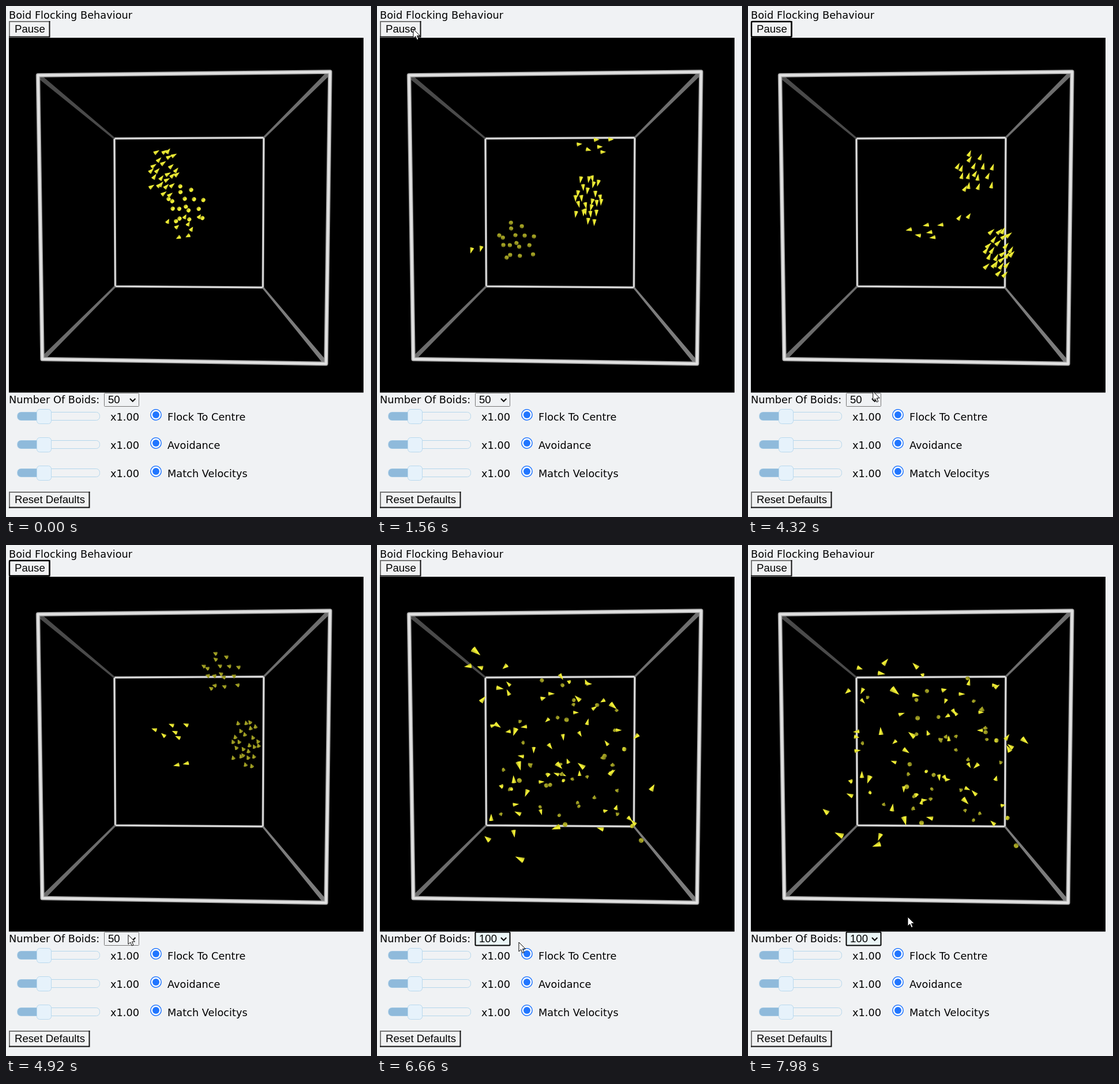
Write an HTML page with a canvas that moves like this. It is 633 px wide and 885 px high and loops after 8 s.

```html
<!DOCTYPE html>
<html lang="en">
<head>
<meta charset="utf-8">
<title>Boid Flocking Behaviour</title>
<style>
  html, body { margin: 0; width: 633px; height: 885px; overflow: hidden; background: #f0f2f4; }
  canvas, svg { position: absolute; left: 0; top: 0; }
  text { font: 17.75px Verdana, "DejaVu Sans", sans-serif; fill: #000; }
  .ui { font: 18.6px "Liberation Sans", Arial, sans-serif; }
</style>
</head>
<body>
<canvas id="stage" width="633" height="885"></canvas>
<svg width="633" height="885">
  <text x="5" y="21.5">Boid Flocking Behaviour</text>
  <g id="buttons"></g>
  <rect id="pauseFocus" x="6" y="27" width="69.5" height="26.5" rx="2" fill="none" stroke="#000" stroke-width="2.4"/>
  <text x="5" y="688">Number Of Boids:</text>
  <rect id="select" x="170.5" y="670.5" width="60" height="23" rx="1"/>
  <text id="count" class="ui" x="177" y="688"></text>
  <path d="M215 680l4.7 4.7l4.7-4.7" fill="none" stroke="#111" stroke-width="2.2"/>
  <g id="sliders"></g>
  <g id="popup">
    <rect x="170.5" y="694.5" width="60" height="149" fill="#fff" stroke="#767676"/>
    <rect id="mark" x="171" width="59" height="21" fill="#1967d2"/>
    <g id="options"></g>
  </g>
  <path id="mouse" d="M0 0V16L3.8 12.6L6.4 18.6L9 17.5L6.5 11.6H11.5Z" fill="#fff" stroke="#000"/>
</svg>
<script>
const $ = id => document.getElementById(id);
const ctx = $('stage').getContext('2d');
const LOOP = 8000, STEP = 60;
const PAUSE = 1980, RESUME = 2640, OPEN = 5040, CLOSE = 5880, RESTART = 6120;

const button = (label, y, width) => `
  <rect x="5" y="${y}" width="${width}" height="28.5" fill="#f1f2f3"/>
  <path d="M6 ${y + 28.5}v-27.5h${width - 1}" fill="none" stroke="#767676" stroke-width="2"/>
  <path d="M5 ${y + 27.5}h${width - 1}v-27.5" fill="none" stroke="#111" stroke-width="2"/>
  <text class="ui" x="15" y="${y + 20}">${label}</text>`;
$('buttons').innerHTML = button('Pause', 26, 71.5) + button('Reset Defaults', 841, 140.5);

$('sliders').innerHTML = ['Flock To Centre', 'Avoidance', 'Match Velocitys'].map((label, i) => `
  <g transform="translate(0 ${i * 49})">
    <rect x="19.5" y="703.5" width="143" height="14" rx="6" fill="#f0f2f4" stroke="#b4d6ec"/>
    <path d="M60 703.5H26a6 6 0 0 0-6 6v2a6 6 0 0 0 6 6H60z" fill="#8fbadb"/>
    <rect x="53.5" y="698.5" width="25" height="25" rx="5" fill="#e6f2fb" stroke="#b9d9ee"/>
    <circle cx="260" cy="708" r="9.2" fill="#fff" stroke="#2176ff" stroke-width="1.5"/>
    <circle cx="260" cy="708" r="6" fill="#2176ff"/>
    <text x="181" y="718">x1.00</text>
    <text x="280" y="718">${label}</text>
  </g>`).join('');
for (let i = 0; i < 7; i++)
  $('options').innerHTML += `<text class="ui" x="177" y="${711 + i * 21}">${50 * (i + 1)}</text>`;

let seed = 29;
const rnd = () => (seed = seed * 16807 % 2147483647) / 2147483647;
const spread = () => rnd() * 2 - 1;
const mix = (a, b, f) => a + (b - a) * f;
const clamp = (v, low, high) => Math.max(low, Math.min(high, v));

// Each flock passes its points at these times; a point is x, y and pitch (negative flies away)
const times = [0, 780, 1560, 2700, 3660, 4260, 5220];
const flocks = [
  { n: 17, rx: 36, ry: 33, path: [[310, 345, 2], [275, 377, 1], [240, 408, -2], [310, 382, 10], [392, 288, 11], [370, 220, -7], [295, 250, 8]] },
  { n: 25, rx: 26, ry: 43, path: [[275, 287, 10], [330, 238, 9], [367, 335, 11], [330, 448, 11], [436, 425, 12], [416, 342, -7], [360, 250, 8]] },
  { n: 6, rx: 30, ry: 18, path: [[310, 375, 8], [360, 310, 9], [380, 242, 9], [405, 315, 9], [308, 390, 10], [286, 322, 9], [205, 335, 9]] },
  { n: 2, rx: 14, ry: 6, path: [[308, 398, 8], [235, 420, 9], [173, 420, 10], [210, 475, 10], [376, 363, 10], [305, 378, 10], [212, 369, 10]] }];
for (const flock of flocks) {
  flock.keys = flock.path.map((point, i) => [times[i], ...point]);
  // Sunflower layout keeps the members apart
  flock.members = Array.from({ length: flock.n }, (_, i) => {
    const r = Math.sqrt((i + .5) / flock.n), a = i * 2.4;
    return { x: flock.rx * (r * Math.cos(a) + spread() * .12), y: flock.ry * (r * Math.sin(a) + spread() * .12), turn: spread() * .25 };
  });
}

// Boids in a unit box, depth 0 at the front and 1 at the rear
const swarm = Array.from({ length: 100 }, () => {
  const angle = rnd() * 2 * Math.PI, pitch = spread(), speed = .4 * Math.sqrt(1 - pitch * pitch);
  return { x: spread(), y: spread(), z: Math.pow(rnd(), .35), angle, pitch,
    vx: speed * Math.cos(angle), vy: speed * Math.sin(angle) };
});

const mousePath = [[540, 650, 22], [900, 330, 20], [1440, 63, 40], [2160, 63, 40], [2220, 55, 40],
  [3420, 53, 42], [4290, 217, 667], [5040, 211, 677], [5700, 213, 722], [6120, 213, 722],
  [6660, 246, 688], [7740, 277, 644]];

// Interpolates rows of [time, ...values], smoothly or in straight lines
function at(keys, t, smooth = true) {
  const last = keys.length - 1;
  t = clamp(t, keys[0][0], keys[last][0]);
  let i = 0;
  while (i < last - 1 && t >= keys[i + 1][0]) i++;
  const a = keys[i], b = keys[i + 1], d = b[0] - a[0], f = (t - a[0]) / d, g = 1 - f;
  const p = keys[Math.max(0, i - 1)], n = keys[Math.min(last, i + 2)];
  return a.map((v, k) => {
    if (!smooth) return mix(v, b[k], f);
    const m0 = (b[k] - p[k]) / (b[0] - p[0]) * d, m1 = (n[k] - v) / (n[0] - a[0]) * d;
    return v * (1 + 2 * f) * g * g + m0 * f * g * g + b[k] * f * f * (3 - 2 * f) - m1 * f * f * g;
  });
}

function cone(x, y, angle, pitch, size = 1) {
  const r = 3.6 * size, length = Math.max(0, Math.abs(pitch) - 2) * 1.2 * size, back = -length * .45;
  const light = clamp(.85 + pitch * .1, .68, 1);
  const tone = k => `rgb(${250 * k * light},${248 * k * light},${55 * k * light})`;
  ctx.save();
  ctx.translate(x, y);
  ctx.rotate(angle);
  const shade = ctx.createLinearGradient(0, -r, 0, r);
  shade.addColorStop(0, tone(.8));
  shade.addColorStop(.4, tone(1));
  shade.addColorStop(1, tone(.65));
  ctx.fillStyle = shade;
  ctx.beginPath();
  ctx.ellipse(back, 0, r * clamp(1 - length / 11, .2, 1), r, 0, 0, 7);
  ctx.fill();
  ctx.beginPath();
  ctx.moveTo(back, -r);
  ctx.lineTo(length * .6, 0);
  ctx.lineTo(back, r);
  ctx.fill();
  ctx.restore();
}

function drawFlock({ keys, members }, u) {
  const [, cx, cy, pitch] = at(keys, u);
  const [, ax, ay] = at(keys, u - 10), [, bx, by] = at(keys, u + 10);
  const heading = Math.atan2(by - ay, bx - ax);
  for (const m of members) cone(cx + m.x, cy + m.y, heading + m.turn, pitch);
}

// Folds a coordinate back between the walls
const bounce = v => Math.abs(((v + 1) % 4 + 4) % 4 - 2) - 1;

function drawSwarm(s) {
  for (const b of swarm) {
    const half = 240 / (1 + b.z * .92);
    const x = bounce(b.x + b.vx * s), y = bounce(b.y + b.vy * s);
    const flipX = bounce(b.x + b.vx * (s + .01)) - x, flipY = bounce(b.y + b.vy * (s + .01)) - y;
    cone(mix(310, 317, b.z) + x * half, mix(365, 358, b.z) + y * half,
      Math.atan2(flipY, flipX), 2 + 9 * Math.sqrt(1 - b.pitch * b.pitch) * (b.pitch < -.4 ? -1 : 1), half / 138);
  }
}

function polygon(points, colour, width) {
  ctx.beginPath();
  points.forEach(p => ctx.lineTo(...p));
  ctx.closePath();
  ctx.lineJoin = 'round';
  ctx.lineWidth = width;
  ctx.strokeStyle = colour;
  ctx.stroke();
}

const front = [[55.5, 120], [562, 114], [555, 619.5], [63, 611.5]];
const rear = [[188, 229.5], [447, 228], [445.5, 487.5], [189.5, 485.5]];

function drawBox() {
  ctx.fillStyle = '#000';
  ctx.fillRect(5, 55, 615, 614.5);
  polygon(rear, '#8c8c8c', 4);
  polygon(rear, '#dedede', 2.4);
  ['#4a4a4a', '#6e6e6e', '#7c7c7c', '#6c6c6c'].forEach((colour, i) => {
    const [x, y] = front[i], [p, q] = rear[i];
    const a = Math.atan2(q - y, p - x), s = Math.sin(a), c = Math.cos(a);
    ctx.fillStyle = colour;
    ctx.beginPath();
    [[x, y, 4], [p, q, 1.7], [p, q, -1.7], [x, y, -4]].forEach(([u, v, w]) => ctx.lineTo(u - s * w, v + c * w));
    ctx.fill();
  });
  polygon(front, '#8a8a8a', 7.5);
  polygon(front, '#c8c8c8', 5.5);
  polygon(front, '#e4e4e4', 3);
}

function draw(t) {
  ctx.clearRect(0, 0, 633, 885);
  drawBox();
  if (t < RESTART) {
    const u = t < PAUSE ? t : Math.max(PAUSE, t - RESUME + PAUSE);
    flocks.forEach(flock => drawFlock(flock, u));
  } else drawSwarm((t - RESTART) / 1000);

  const [, x, y] = at(mousePath, t, false);
  const focused = t >= OPEN, open = focused && t < CLOSE, row = y > 715 ? 1 : 0;
  $('mouse').setAttribute('transform', `translate(${x} ${y})`);
  $('pauseFocus').style.display = t >= 1740 && !focused ? '' : 'none';
  $('select').style.cssText = focused
    ? 'fill:#ebf5f6;stroke:#000;stroke-width:2' : 'fill:#f0f2f4;stroke:#767676;stroke-width:1';
  $('count').textContent = t < CLOSE ? 50 : 100;
  $('popup').style.display = open ? '' : 'none';
  $('mark').setAttribute('y', 695 + row * 21);
  [...$('options').children].forEach((o, i) => o.style.fill = i === row ? '#fff' : '#000');
}

const start = performance.now();
function tick() {
  const t = (performance.now() - start) % LOOP;
  draw(Math.floor(t / STEP) * STEP);
  requestAnimationFrame(tick);
}
tick();
</script>
</body>
</html>
```
